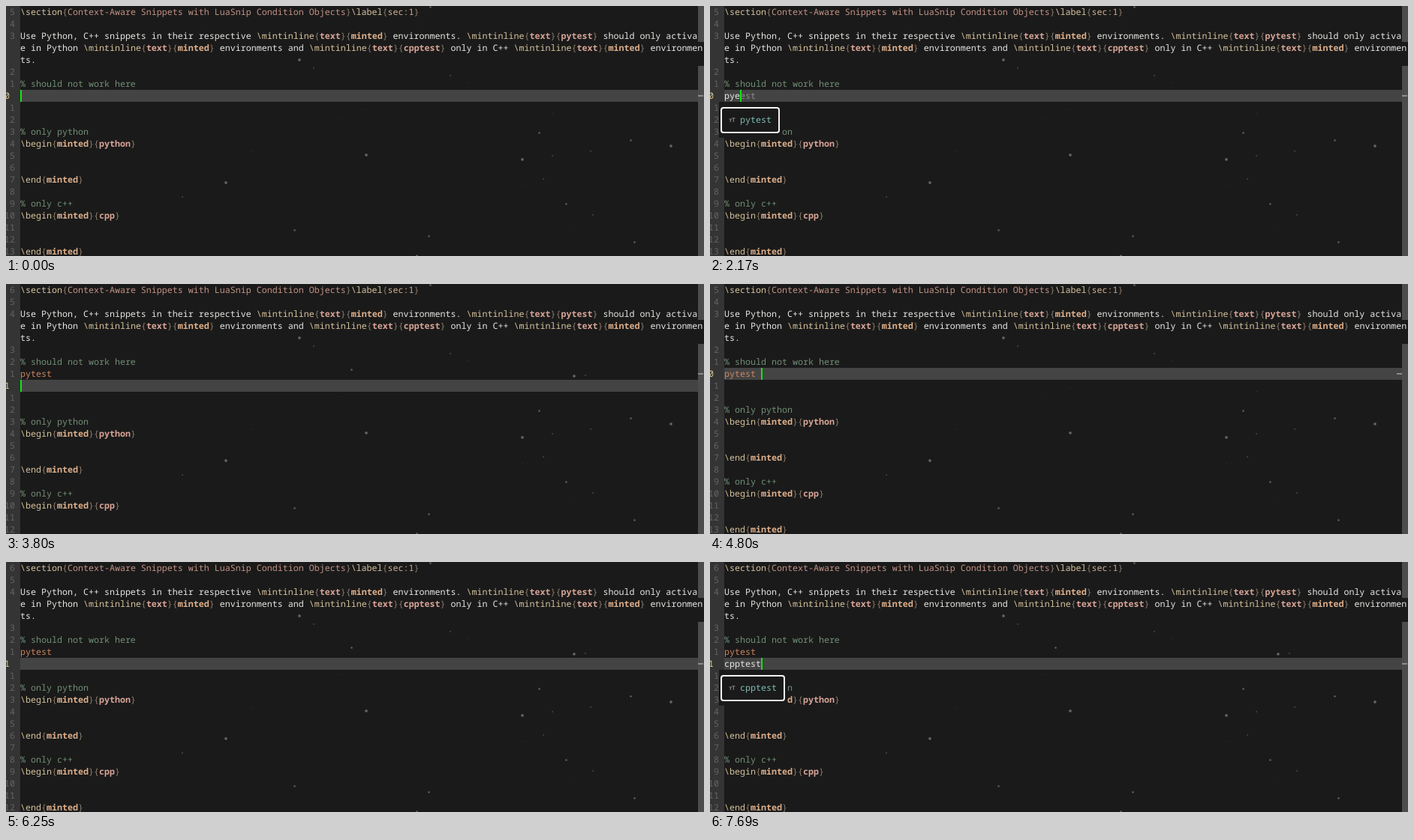
Recreate the animation shown at these times as an HTML page. Size 930x334 px, loop 8000 ms.

```html
<!DOCTYPE html>
<html lang="en">
<head>
<meta charset="utf-8">
<title>Snippet completion</title>
<style>
  html, body { margin: 0; width: 100%; height: 100%; overflow: hidden; background: #1a1a1a; }
  #stage {
    position: relative; width: 930px; height: 334px; overflow: hidden;
    background: #1a1a1a; color: #e6e6e3;
    font: 11.6667px/16px "Noto Sans Mono", "Liberation Mono", monospace;
    text-rendering: geometricPrecision; font-variant-ligatures: none;
  }
  #stage div { position: absolute; white-space: pre; }
  .gutter { left: 0; top: 0; width: 19px; height: 334px; background: #343434; }
  .bar { left: 922px; width: 8px; background: #4c4c4c; }
  .star { border-radius: 50%; background: radial-gradient(#909090 30%, #90909060); }
  .line, .num, .item, .icon { margin-top: 1px; }
  .line { left: 19px; height: 16px; }
  .num { left: -16px; width: 28px; height: 16px; text-align: right; color: #646464; }
  .num.now { width: 21px; color: #d9cf9c; }
  .current { left: 19px; width: 903px; height: 16px; background: #444; }
  .mark { width: 7px; height: 2px; background: #8c8c8c; }
  .cursor { width: 2px; height: 16px; background: #14e414; }
  .comment { color: #728f76; }
  .command { color: #d6c29c; }
  .brace { color: #8c7c6c; }
  .title { color: #c29184; }
  .label { color: #d2ad91; }
  .env { color: #dfb08b; font-weight: bold; }
  .arg { color: #d8a496; font-weight: bold; }
  .hot { color: #cc845f; }
  .ghost { color: #8a8a8a; }
  .popup { left: 12px; background: #1a1a1a; color: #80bdb3; }
  .frame { left: 2px; top: 7px; right: 3px; bottom: 6px; border: 2px solid #f4f4f4; border-radius: 4px; box-sizing: border-box; }
  .item { left: 28px; }
  .icon { left: 13px; font-size: 8px; font-weight: bold; letter-spacing: -.7px; color: #858585; }
</style>
</head>
<body>
<div id="stage">
  <div class="gutter"></div>
  <div class="bar" style="top:0;height:48px"></div>
  <div class="bar" style="top:80px;height:254px"></div>
  <div id="sky"></div>
  <div id="editor"></div>
</div>
<script>
const LOOP = 8000, CELL = 7, ROW = 16, LEFT = 19;

const head = [
  "\\section{Context-Aware Snippets with LuaSnip Condition Objects}\\label{sec:1}",
  "",
  "Use Python, C++ snippets in their respective \\mintinline{text}{minted} environments. \\mintinline{text}{pytest} should only activa",
  "e in Python \\mintinline{text}{minted} environments and \\mintinline{text}{cpptest} only in C++ \\mintinline{text}{minted} environmen",
  "ts.",
  "",
  "% should not work here"
];
const tail = [
  "% only python", "\\begin{minted}{python}", "", "", "\\end{minted}", "",
  "% only c++", "\\begin{minted}{cpp}", "", "", "\\end{minted}"
];
const isWrapped = row => row === 3 || row === 4;

// x, y, diameter
const stars = [
  [391, 72, 4], [410, 83, 2], [592, 93, 2], [614, 102, 1], [460, 114, 3], [757, 123, 4], [772, 122, 2],
  [443, 150, 1], [479, 138, 1], [728, 143, 1], [710, 169, 3], [832, 179, 3], [886, 187, 4], [779, 194, 2],
  [480, 199, 4], [688, 205, 4], [728, 200, 2], [326, 194, 1], [293, 236, 4], [235, 255, 2], [746, 264, 3],
  [716, 231, 2], [688, 239, 1], [782, 279, 2], [837, 315, 3], [384, 299, 3], [563, 307, 3], [547, 333, 3],
  [132, 58, 3], [565, 1, 3], [755, 291, 1]
];

const one = ["pytest"], three = [...one, "Python", "python"], four = [...three, "cpp"];
const first = (text, items, more) => ({ lines: [text, "", ""], at: 0, items, ...more });
const second = (text, items, more) => ({ lines: ["pytest", text, ""], at: 1, items, hot: true, ...more });
const split = { lines: ["pytest", "", "", ""], at: 1, hot: true };
const cpp = ["cpptest"];

const steps = [
  [0, first("")],
  [1450, first("p")],
  [1720, first("p", four)],
  [1900, first("py", four)],
  [1990, first("py", three)],
  [2170, first("pye", one)],
  [2350, first("py", one)],
  [2530, first("py", three)],
  [2620, first("pyt", three)],
  [2710, first("pyt", one)],
  [2800, first("pyte", one)],
  [2890, first("pytes", one)],
  [2990, first("pytest", one)],
  [3350, first("pytest")],
  [3440, first("pytest", null, { hot: true })],
  [3530, { ...split, markRow: 7 }],
  [3890, split],
  [4710, first("pytest", null, { hot: true })],
  [4800, first("pytest ", null, { hot: true, markLeft: 915 })],
  [4890, first("pytest ", null, { hot: true })],
  [5250, first("pytest", null, { hot: true })],
  [5430, second("")],
  [6250, second("", null, { hidden: true })],
  [6340, second("c")],
  [6520, second("cp")],
  [6610, second("cpp")],
  [6700, second("cppt")],
  [6880, second("cppt", cpp)],
  [7330, second("cppte", cpp)],
  [7510, second("cpptes", cpp)],
  [7690, second("cpptest", cpp)]
];

const span = (name, text) => `<span class="${name}">${text}</span>`;
const box = (name, style, text = "") => `<div class="${name}" style="${style}">${text}</div>`;

function tokenClass(token) {
  if (token[0] === "%") return "comment";
  if (token[0] === "\\") return "command";
  if (token === "{" || token === "}") return "brace";
  if (token.startsWith("Context")) return "title";
  if (token === "sec:1") return "label";
  return token === "minted" ? "env" : "arg";
}

const highlight = line =>
  line.replace(/%.*|\\[a-z]+|[{}]|(?<=\{)[^}]+/g, token => span(tokenClass(token), token));

function popup(items, row) {
  const width = (Math.max(...items.map(item => item.length)) + 6) * CELL;
  const height = (items.length + 2) * ROW;
  const entries = items.map((item, i) => {
    const top = `top:${(i + 1) * ROW}px`;
    return box("icon", top, "тT") + box("item", top, item);
  });
  return box("popup", `top:${row * ROW}px;width:${width}px;height:${height}px`,
    box("frame", "") + entries.join(""));
}

function view({ lines, at, items, hot, hidden, markRow, markLeft = 922 }) {
  const rows = [...head, ...lines, ...tail];
  const current = head.length + at;
  const typed = lines[at];
  const logical = row => row - (row > 4 ? 2 : Math.max(0, row - 2));
  let html = box("current", `top:${current * ROW}px`);

  rows.forEach((line, row) => {
    const top = `top:${row * ROW}px`;
    const distance = Math.abs(logical(row) - logical(current));
    let content = hot && row === head.length ? span("hot", line) : highlight(line);
    if (items && row === current) content += span("ghost", items[0].slice(typed.length));
    html += box("line", top, content);
    if (row === current) html += box("num now", top, at);
    else if (!isWrapped(row)) html += box("num", top, distance);
  });

  html += box("mark", `left:${markLeft}px;top:${(markRow ?? current) * ROW + 7}px`);
  if (!hidden) html += box("cursor", `left:${LEFT + typed.length * CELL}px;top:${current * ROW}px`);
  if (items) html += popup(items, current + 1);
  return html;
}

document.getElementById("sky").innerHTML = stars.map(([x, y, d]) =>
  box("star", `left:${x - d / 2}px;top:${y - d / 2}px;width:${d}px;height:${d}px;opacity:${.25 + d * .1}`)
).join("");

const editor = document.getElementById("editor");
const start = performance.now();
let shown;

function draw() {
  const time = (performance.now() - start) % LOOP;
  const step = steps.findLast(([from]) => from <= time) || steps[0];
  if (step !== shown) {
    editor.innerHTML = view(step[1]);
    shown = step;
  }
  requestAnimationFrame(draw);
}
draw();
</script>
</body>
</html>
```
